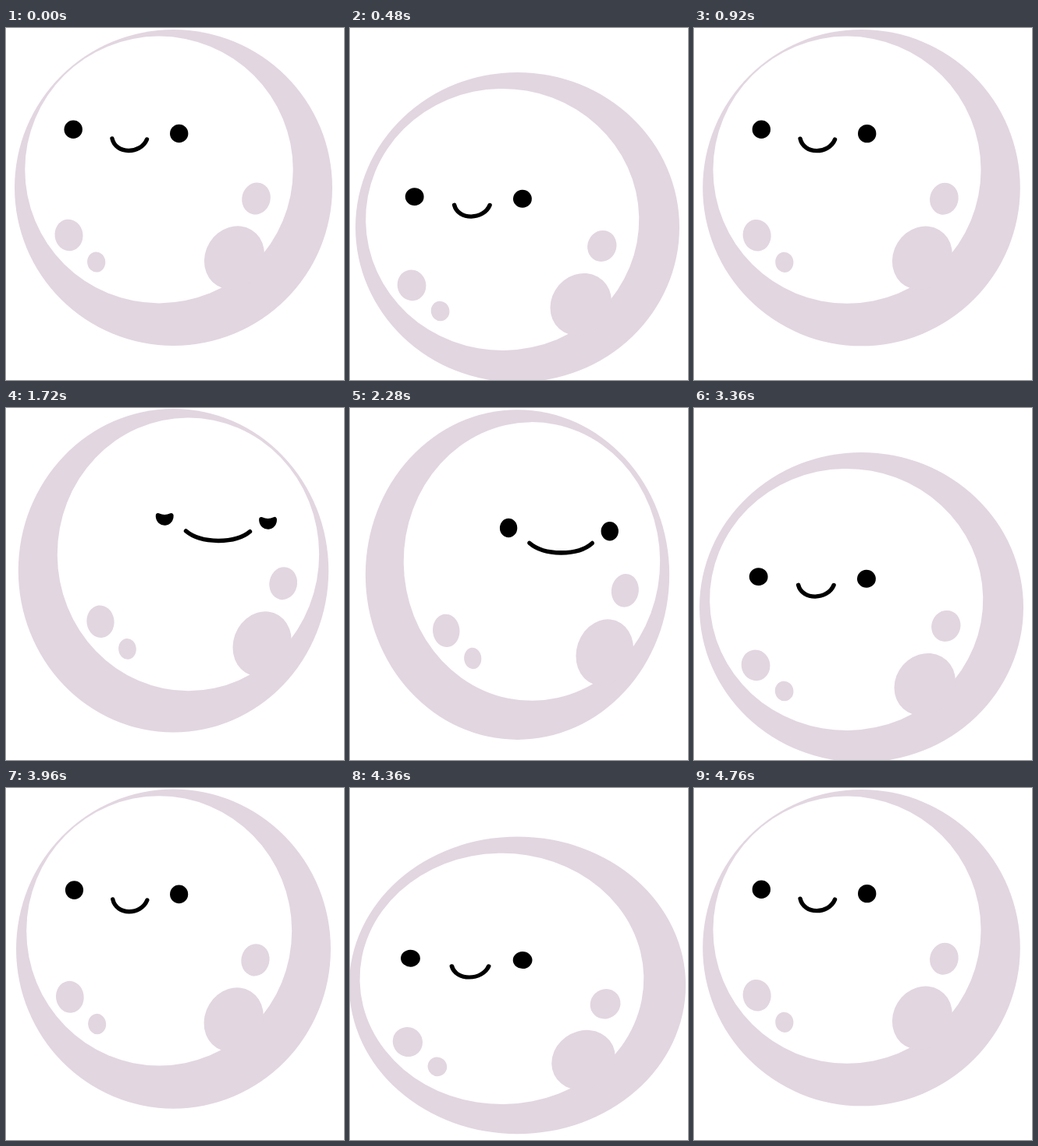
Recreate the animation shown at these times as an HTML page with a canvas. Size 433 by 452 pixels, loop 4.8 s.

```html
<!DOCTYPE html>
<html lang="en">
<head>
<meta charset="utf-8">
<title>Bouncing moon</title>
<style>
html, body { margin: 0; width: 100%; height: 100%; overflow: hidden; background: #fff; }
canvas { display: block; }
</style>
</head>
<body>
<canvas id="stage" width="433" height="452"></canvas>
<script>
const ctx = document.getElementById('stage').getContext('2d');
const LOOP = 4800, BOUNCE = 960, STEP = 40;
const LILAC = '#e2d6e0', CENTER_X = 214.5, REST_Y = 205, REST_W = 407, REST_H = 406;

const clamp = u => Math.min(1, Math.max(0, u));
const ramp = (t, from, to) => clamp((t - from) / (to - from));
const smooth = (t, from, to) => {
  const u = ramp(t, from, to);
  return u * u * (3 - 2 * u);
};
const settle = (t, from, to, power) => (1 - ramp(t, from, to)) ** power;

// Extra height in pixels: stretch, squash on landing, stretch again, settle
function stretchAt(phase) {
  if (phase > 685) return 18 * settle(phase, 685, BOUNCE, 2);
  return 18 * smooth(phase, 0, 390) - 52 * smooth(phase, 390, 570) + 52 * smooth(phase, 570, 685);
}

const dropAt = phase => 58.5 * Math.sin(Math.PI * ramp(phase, 340, 680)) ** 2;
const glanceAt = phase => 38 * smooth(phase, 180, 560) * settle(phase, 600, BOUNCE, 3);

function ellipse(x, y, rx, ry, color, tilt = 0) {
  ctx.fillStyle = color;
  ctx.beginPath();
  ctx.ellipse(x, y, rx, ry, tilt, 0, Math.PI * 2);
  ctx.fill();
}

const crater = (x, y, r, tilt) => ellipse(x, y, r, r * 1.13, LILAC, tilt);

function eye(x, y, lid) {
  if (lid <= 0) return ellipse(x, y, 11.7, 11.7, '#000');
  const r = 8.7, edge = -r + 16 * lid, angle = Math.asin(edge / r);
  ctx.beginPath();
  ctx.arc(x, y, r, angle, Math.PI - angle);
  ctx.quadraticCurveTo(x, y + edge + 4, x + r * Math.cos(angle), y + edge);
  ctx.closePath();
  ctx.lineWidth = 6;
  ctx.fillStyle = '#000';
  ctx.fill();
  ctx.stroke();
}

function mouth(wide) {
  const out = 22 * wide, drop = 7 * wide, bottom = -42.5 + drop * 0.4;
  ctx.lineWidth = 5.4;
  ctx.beginPath();
  ctx.moveTo(-78.5 - out, -63 + drop);
  ctx.bezierCurveTo(-74 - out * 0.3, bottom, -42 + out * 0.3, bottom, -34 + out * 0.8, -62 + drop);
  ctx.stroke();
}

function draw(time) {
  const phase = time % BOUNCE, bounce = Math.floor(time / BOUNCE);
  const stretch = stretchAt(phase), glance = glanceAt(phase);
  const look = smooth(time, 1400, 1680) - smooth(time, 2360, 2640);
  const turning = bounce === 1 || bounce === 2;
  const lid = turning ? smooth(phase, 480, 560) - smooth(phase, 680, 840) : 0;

  ctx.setTransform(1, 0, 0, 1, 0, 0);
  ctx.fillStyle = '#fff';
  ctx.fillRect(0, 0, 433, 452);
  ctx.translate(CENTER_X, REST_Y + 0.4 * stretch + dropAt(phase));
  ctx.scale(1 - stretch / REST_W, 1 + stretch / REST_H);
  ellipse(0, 0, REST_W / 2, REST_H / 2, LILAC);

  // The lit side slides with the gaze, the face slides further
  ctx.translate(38 * look, 0.37 * glance);
  ctx.rotate(-0.00055 * glance);
  ellipse(-18.5, -23, 171.7, 171.4, '#fff');
  crater(-134, 61, 18, -0.14);
  crater(-98.8, 95.5, 11.6, -0.1);
  crater(106, 14, 18.2, 0.25);
  crater(78, 90, 37.2, 0.55);

  ctx.translate(79 * look, 0.59 * glance);
  ctx.strokeStyle = '#000';
  ctx.lineCap = ctx.lineJoin = 'round';
  eye(-128.3, -74.8, lid);
  eye(7.2, -69.5, lid);
  mouth(look);
}

const start = performance.now();
function tick() {
  const elapsed = (performance.now() - start) % LOOP;
  draw(Math.floor(elapsed / STEP) * STEP);
  requestAnimationFrame(tick);
}
tick();
</script>
</body>
</html>
```
